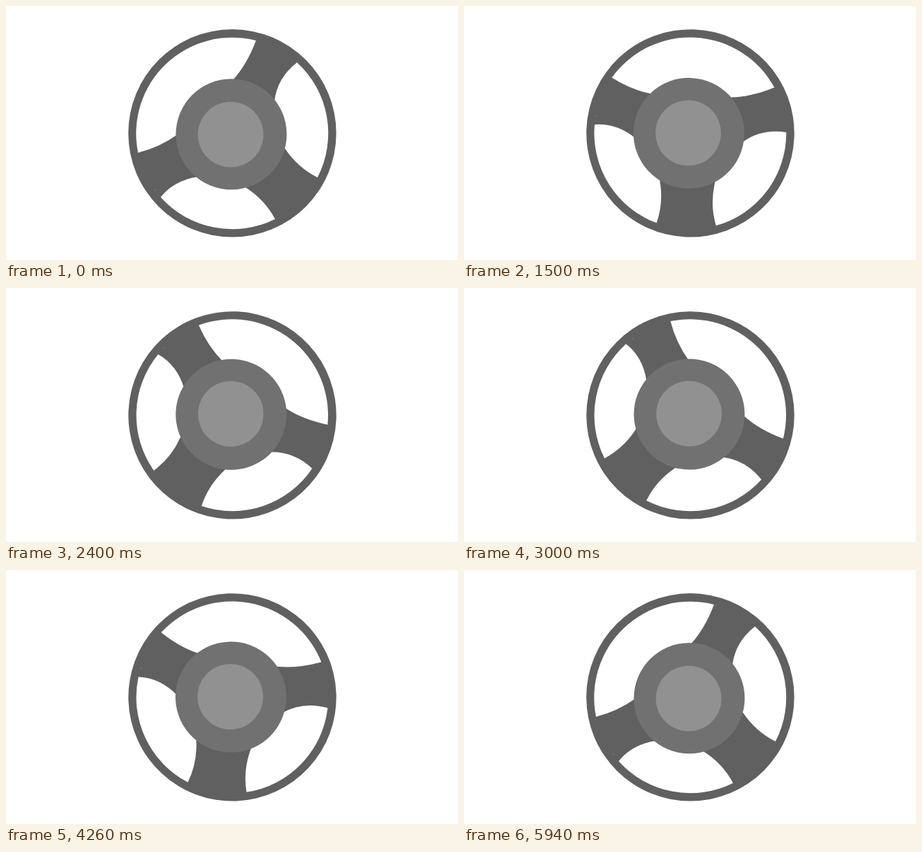
Recreate the animation shown at these times as an HTML page. Size 640x360 px, loop 6 s.

```html
<!DOCTYPE html>
<html lang="en">
<head>
<meta charset="utf-8">
<title>Steering wheel</title>
<style>
  html, body { margin: 0; height: 100%; overflow: hidden; background: #fff; }
  svg { display: block; width: 100%; height: 100%; }
</style>
</head>
<body>
<svg viewBox="0 0 640 360">
  <g id="wheel">
    <circle cx="320.4" cy="180.3" r="147.2" fill="#606060"/>
    <g fill="#fff">
      <path d="M187 208A136 136 0 0 1 354 49Q341 83 322 104L319 182L243 182Q218 200 187 208Z"/>
      <path d="M412 80A136 136 0 0 1 441 243Q413 229 395 202L319 182L380 135Q384 102 412 80Z"/>
      <path d="M381 302A136 136 0 0 1 219 271Q238 247 272 242L319 182L339 257Q366 274 381 302Z"/>
    </g>
    <circle cx="319" cy="181.8" r="78.5" fill="#717171"/>
    <circle cx="318.1" cy="182.2" r="46.4" fill="#919191"/>
    <circle cx="211.5" cy="261" r=".7" fill="#999"/>
  </g>
</svg>
<script>
const LOOP = 6000, STEP = 60, HALF = 2970, SWING = 89.8;
const wheel = document.getElementById('wheel');

// Ease along the cubic Bézier (0,0) (a,0) (b,1) (1,1)
function ease(x, a, b) {
  let lo = 0, hi = 1, s;
  for (let i = 0; i < 24; i++) {
    s = (lo + hi) / 2;
    const r = 1 - s;
    if (3 * a * s * r * r + 3 * b * s * s * r + s ** 3 < x) lo = s;
    else hi = s;
  }
  return s * s * (3 - 2 * s);
}

function angleAt(t) {
  return SWING * (t < HALF
    ? ease(t / HALF, 0.3, 0.67)
    : 1 - ease((t - HALF) / HALF, 0.36, 0.64));
}

function draw() {
  const t = Math.floor(performance.now() % LOOP / STEP) * STEP;
  wheel.setAttribute('transform', `rotate(${angleAt(t).toFixed(3)} 320.4 180.4)`);
  requestAnimationFrame(draw);
}
draw();
</script>
</body>
</html>
```
